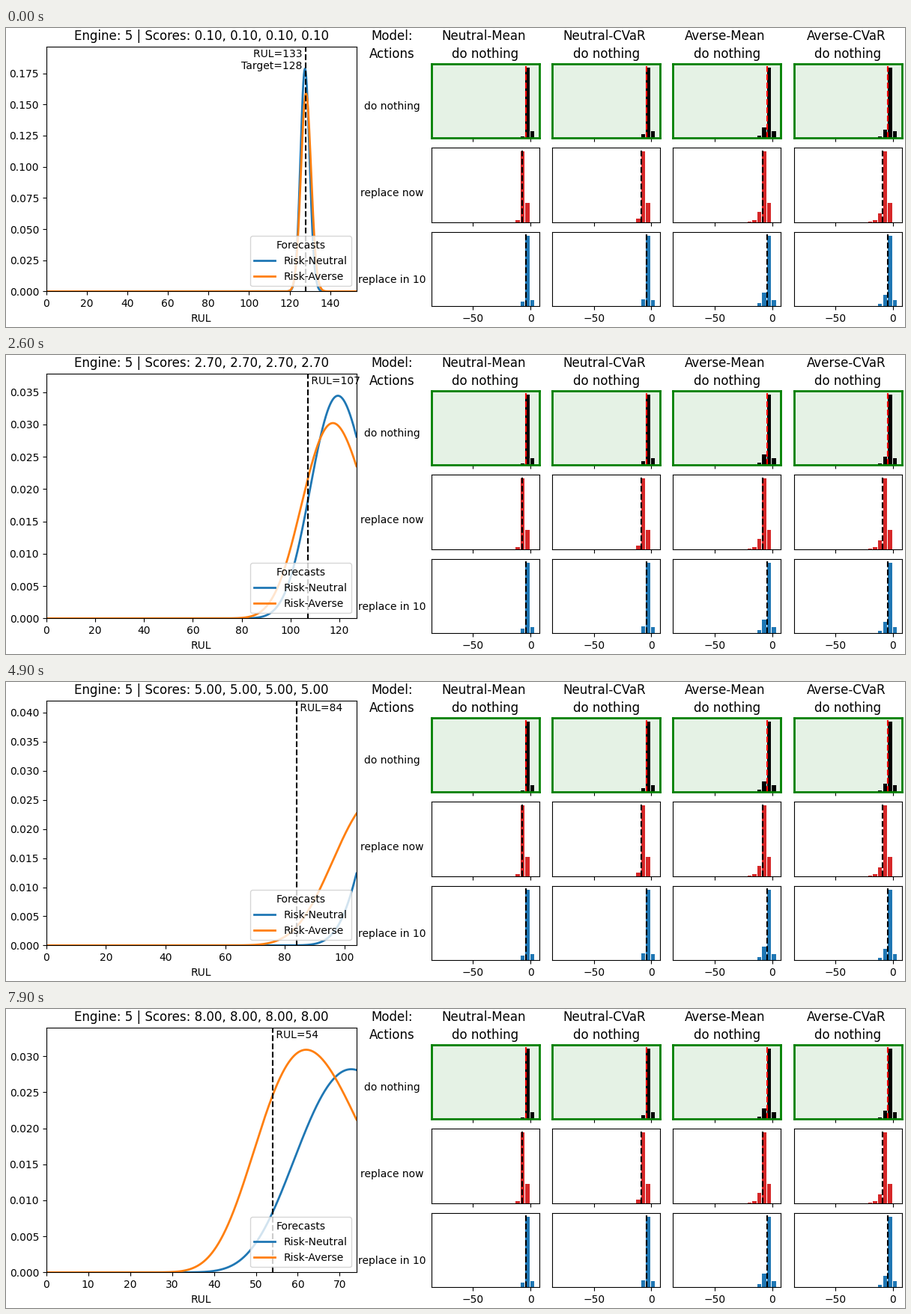
Recreate the animation shown at these times as a matplotlib script. Size 1200 px wide and 400 px high, loop 8 s.

```python
import numpy as np
import matplotlib.pyplot as plt
from matplotlib.animation import FuncAnimation

W, H, DPI = 1200, 400, 100
FRAMES, INTERVAL = 80, 100
START_RUL, CAP = 133, 128

plt.rcParams["font.family"] = "DejaVu Sans"
fig = plt.figure(figsize=(W / DPI, H / DPI), dpi=DPI, facecolor="white")


def add_axes(left, top, width, height):
    return fig.add_axes([left / W, 1 - (top + height) / H, width / W, height / H])


def label(x, baseline, text, size):
    fig.text(x / W, 1 - baseline / H, text, fontsize=size, ha="center", va="baseline")


# Key points of the forecasts: step, then mode and shape of each log-normal.
KEYS = np.array([
    (0, 127.6, 0.0175, 128.1, 0.0196),
    (19, 115.5, 0.1222, 113.2, 0.1405),
    (34, 123.9, 0.0672, 122.1, 0.079),
    (42, 118.8, 0.0977, 103.8, 0.191),
    (58, 118.4, 0.0745, 121.0, 0.072),
    (66, 95.0, 0.2125, 85.2, 0.27),
    (79, 72.75, 0.191, 62.0, 0.204),
])
GRID = np.linspace(0.01, 200, 2001)


def forecast(step, col):
    mode, shape = (np.interp(step, KEYS[:, 0], KEYS[:, c]) for c in (col, col + 1))
    peak = np.exp(-shape**2 / 2) / (mode * shape * np.sqrt(2 * np.pi))
    return peak * np.exp(-np.log(GRID / mode) ** 2 / (2 * shape**2)), peak


# Forecast panel
main = add_axes(53.8, 24.7, 414, 327.7)
neutral, = main.plot([], [], color="tab:blue", lw=2, label="Risk-Neutral")
averse, = main.plot([], [], color="tab:orange", lw=2, label="Risk-Averse")
marker = main.axvline(0, color="black", ls="--", lw=1.5)
note = main.text(0, 0.99, "", transform=main.get_xaxis_transform(), va="top")
main.set_xlabel("RUL")
main.legend(handles=[neutral, averse], title="Forecasts", loc="lower right")
title = main.set_title("", fontsize=12)

# Each action: name, colour, cost in bins, height right of the peak, extra tail.
ACTIONS = [
    ("do nothing", "black", 0, 0.1, 0),
    ("replace now", "tab:red", 1, 0.27, 0),
    ("replace in 10", "tab:blue", 0, 0.09, 0.04),
]
MODELS = ["Neutral-Mean", "Neutral-CVaR", "Averse-Mean", "Averse-CVaR"]
BIN, CENTER = 4.276, -2.68


def action_panel(col, row):
    _, color, shift, right, extra = ACTIONS[row]
    is_averse, is_cvar = divmod(col, 2)

    # One peak with a bar to its right and a tail fading to its left.
    tail = (0.15 - 0.03 * is_cvar if is_averse else 0.03 + 0.025 * is_cvar) + extra
    fade = 0.22 ** np.arange(1 + is_averse * (1 + shift))
    heights = [right, 1, *(tail * fade)]
    bins = CENTER + BIN * (1 - shift - np.arange(len(heights)))
    risk = -(3.7 + 0.5 * is_cvar + 0.4 * is_averse) * (1 + shift)

    ax = add_axes(567.8 + 161.3 * col, 48 + 112.4 * row, 144, 99.4)
    ax.bar(bins, heights, width=0.83 * BIN, color=color)
    ax.axvline(risk, color="black" if row else "red", ls="--", lw=1.5)
    ax.set(xlim=(-86.3, 7.7), ylim=(0, 1.05), xticks=[-50, 0], yticks=[])
    ax.tick_params(labelbottom=row == 2)
    if row == 0:
        ax.set_facecolor(("green", 0.1))
        for spine in ax.spines.values():
            spine.set(color="green", linewidth=2)


label(515, 16.2, "Model:", 12)
label(515, 40, "Actions", 12)
for row, action in enumerate(ACTIONS):
    label(515, 109 + 116.2 * row, action[0], 10)
for col, model in enumerate(MODELS):
    x = 640 + 161.3 * col
    label(x - 2.7, 16.2, model, 12)
    label(x, 40, ACTIONS[0][0], 12)
    for row in range(len(ACTIONS)):
        action_panel(col, row)


def update(step):
    rul = START_RUL - step
    target = min(rul, CAP)
    y_neutral, top_neutral = forecast(step, 1)
    y_averse, top_averse = forecast(step, 3)
    neutral.set_data(GRID, y_neutral)
    averse.set_data(GRID, y_averse)
    main.set_xlim(0, rul + 20)
    main.set_ylim(0, 1.1 * max(top_neutral, top_averse))
    marker.set_xdata([target, target])

    note.set_x(target)
    if rul > CAP:
        note.set(text=f"RUL={rul} \nTarget={CAP} ", ha="right")
    else:
        note.set(text=f" RUL={rul}", ha="left")
    score = f"{(step + 1) / 10:.2f}"
    title.set_text("Engine: 5 | Scores: " + ", ".join([score] * 4))
    return neutral, averse, marker, note, title


anim = FuncAnimation(fig, update, frames=FRAMES, interval=INTERVAL,
                     repeat=True, repeat_delay=0, blit=False)
plt.show()
```
